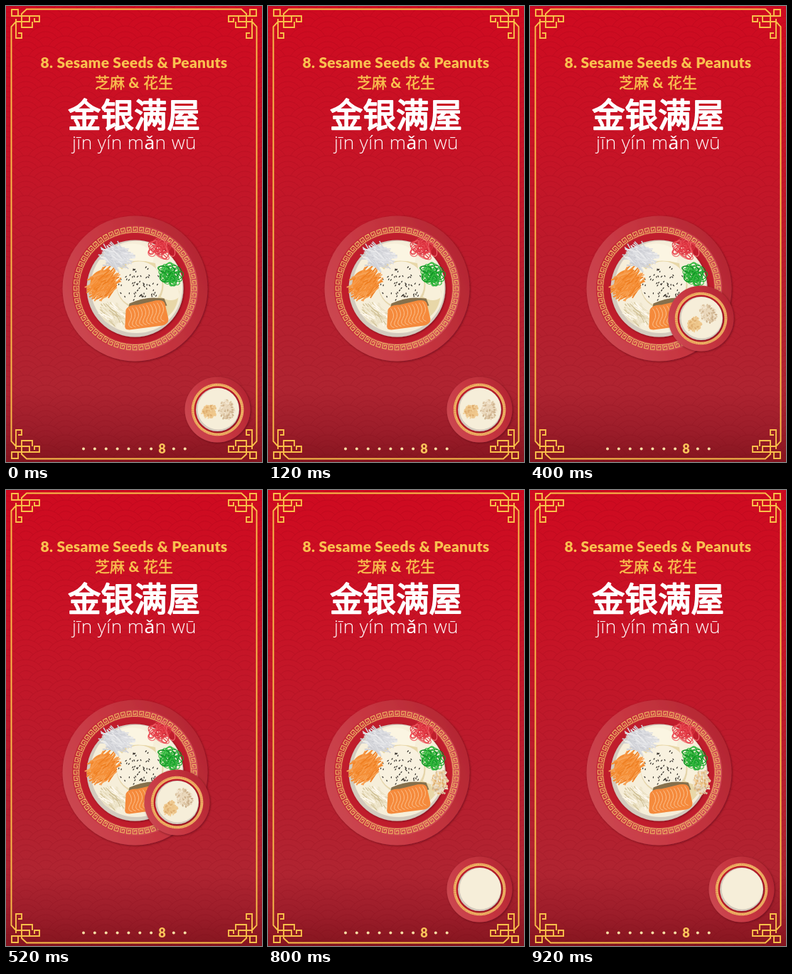
These frames come from a looping animation (360 by 640 pixels, 1 s). An HTML page:

```html
<!DOCTYPE html>
<html lang="en">
<head>
<meta charset="utf-8">
<title>Sesame Seeds &amp; Peanuts</title>
<style>
html, body { margin: 0; width: 100%; height: 100%; overflow: hidden; background: #c0182b; }
svg { display: block; width: 360px; height: 640px; }
text { text-anchor: middle; stroke-linejoin: round; }
.title { font: 900 21px Lato, sans-serif; letter-spacing: .25px; fill: #f9c04f; }
.sub { font: 400 21px Lato, "Noto Sans CJK SC", "Noto Sans CJK", sans-serif; fill: #f9c04f; stroke: #f9c04f; stroke-width: .5; }
.sub tspan { font-weight: 800; stroke: none; }
.big { font: 400 46.5px "Noto Sans CJK SC", "Noto Sans CJK", sans-serif; fill: #fff; stroke: #fff; stroke-width: 1.9; }
.pinyin { font: 300 26.3px "Open Sans", "Noto Sans", sans-serif; letter-spacing: .4px; fill: #fff; }
.page { font: 900 18px Lato, sans-serif; fill: #f9c35a; }
</style>
</head>
<body>
<svg id="stage" viewBox="0 0 360 640" fill="none">
  <defs>
    <linearGradient id="sky" x2="0" y2="1">
      <stop stop-color="#cf0a20"/><stop offset=".3" stop-color="#c81326"/>
      <stop offset=".6" stop-color="#ba1c2d"/><stop offset=".84" stop-color="#b02431"/>
      <stop offset=".93" stop-color="#9c1d2a"/><stop offset="1" stop-color="#85151f"/>
    </linearGradient>
    <linearGradient id="dish" x1=".05" y1=".7" x2=".95" y2=".3">
      <stop stop-color="#cb4650"/><stop offset=".45" stop-color="#c73641"/><stop offset="1" stop-color="#b52733"/>
    </linearGradient>
    <linearGradient id="lane" x1="0" y1=".3" x2="1" y2=".7">
      <stop stop-color="#c32a37"/><stop offset="1" stop-color="#d2505a"/>
    </linearGradient>
    <filter id="shade" x="-20%" y="-20%" width="140%" height="140%">
      <feDropShadow dx="1" dy="1" stdDeviation="1.6" flood-color="#4a0008" flood-opacity=".55"/>
    </filter>
    <g id="corner" stroke="#f9bf4a" stroke-width="1.9">
      <path d="M180 4.5H29L22 11V30H37V22M7.5 320V29L14 22H33V15M8 5H17V14H8ZM17 14H47V22H40V17M14 18V45H22V38H17"/>
    </g>
  </defs>
  <rect width="360" height="640" fill="url(#sky)"/>
  <path id="waves" stroke="#6a0014" stroke-opacity=".13"/>
  <use href="#corner"/>
  <use href="#corner" transform="matrix(-1 0 0 1 360 0)"/>
  <use href="#corner" transform="matrix(1 0 0 -1 0 640)"/>
  <use href="#corner" transform="matrix(-1 0 0 -1 360 640)"/>
  <text class="title" x="180" y="87">8. Sesame Seeds &amp; Peanuts</text>
  <text class="sub" x="180" y="115">芝麻 <tspan>&amp;</tspan> 花生</text>
  <text class="big" x="180" y="170">金银满屋</text>
  <text class="pinyin" x="180.5" y="201">jīn yín mǎn wū</text>
  <g id="dots" fill="#f9dfa5"></g>
  <text class="page" x="219.5" y="628">8</text>
  <g id="main" transform="translate(181.5 396.5)"></g>
  <g id="side"></g>
</svg>
<script>
const $ = id => document.getElementById(id);
let seed = 8;
const rnd = () => (seed = seed * 16807 % 2147483647) / 2147483647;
const spread = r => (rnd() * 2 - 1) * r;
const pick = list => list[Math.floor(rnd() * list.length)];
const repeat = (n, fn) => Array.from({ length: n }, (_, i) => fn(i)).join('');
const f = v => v.toFixed(1);

// a random point inside an ellipse
function spot(cx, cy, rx, ry) {
  const a = rnd() * 2 * Math.PI, r = Math.sqrt(rnd());
  return [cx + rx * r * Math.cos(a), cy + ry * r * Math.sin(a)];
}

const blob = (cx, cy, rx, ry, fill) =>
  `<ellipse cx="${cx}" cy="${cy}" rx="${rx}" ry="${ry}" fill="${fill}"/>`;

// a heap of shredded strips lying at roughly the same angle (degrees)
function strips(n, cx, cy, rx, ry, angle, wobble, len, width, colors) {
  return blob(cx, cy, rx, ry, colors[0]) + repeat(n, () => {
    const [x, y] = spot(cx, cy, rx, ry);
    const a = (angle + spread(wobble)) * Math.PI / 180;
    const dx = Math.cos(a) * len / 2, dy = Math.sin(a) * len / 2;
    return `<path d="M${f(x - dx)} ${f(y - dy)}L${f(x + dx)} ${f(y + dy)}" stroke="${pick(colors)}" stroke-width="${width}"/>`;
  });
}

// a tangle of thin loops
function tangle(n, cx, cy, rx, ry, colors) {
  return repeat(n, () => {
    const [x, y] = spot(cx, cy, rx, ry);
    return `<ellipse cx="${f(x)}" cy="${f(y)}" rx="${f(4 + rnd() * 7)}" ry="${f(2 + rnd() * 4)}"
      transform="rotate(${f(rnd() * 180)} ${f(x)} ${f(y)})" stroke="${pick(colors)}" stroke-width="1.1"/>`;
  });
}

function crumbs(n, cx, cy, rx, ry, colors) {
  return blob(cx, cy, rx * .8, ry * .8, colors[0]) + repeat(n, () => {
    const [x, y] = spot(cx, cy, rx, ry);
    return `<ellipse cx="${f(x)}" cy="${f(y)}" rx="1.9" ry="1.2" fill="${pick(colors)}" transform="rotate(${f(rnd() * 180)} ${f(x)} ${f(y)})"/>`;
  });
}

const tan = ['#ecc48a', '#f2d09a', '#dfae70', '#f0c88c'];
const pale = ['#ead8bc', '#dcc4a2', '#f3e7d2', '#ceb28e'];

// red dish, key-pattern band and cream bowl
function plate(r, band, size, count, bowl) {
  const key = `M-.5 .5H.4V-.4H-.3V.2H.1V-.1`;
  return `<circle r="${r}" fill="url(#dish)" filter="url(#shade)"/>
    <circle r="${band + size * .7}" fill="url(#lane)"/>
    <circle r="${band - size * .7}" fill="#c01d2c"/>` +
    repeat(count, i => `<path d="${key}" stroke="#efb562" stroke-width="${1.1 / size}"
      transform="rotate(${f(i * 360 / count)}) translate(0 ${-band}) scale(${size})"/>`) +
    `<circle r="${bowl}" fill="#d3cabd" filter="url(#shade)"/>
    <circle cx="${bowl * .03}" cy="${-bowl * .03}" r="${bowl * .95}" fill="#f6eed9"/>`;
}

const salmon = `<path d="M-8 21Q10 13 26 13L41 14L45 24L-10 30Z" fill="#86704c"/>
  <path d="M-13 30Q-9 22 3 23L24 18Q39 14 42 21L47 43Q47 50 38 52L-8 58Q-16 58-14 50Z" fill="#f58a3c"/>` +
  repeat(10, i => `<path d="M${-9 + i * 5} ${f(28 - i)}q7 9 2 17t3 10" stroke="#fcc08c"/>`);

$('main').innerHTML = plate(102, 83, 8, 60, 68) +
  blob(-4, -42, 30, 21, '#fbf5e2') +
  `<path d="M-25-33Q10-48 50-26L62 4Q60 32 42 42L30 20Z" fill="#e8d7a8"/>
   <path d="M28-40Q62-22 62 12Q50 22 34 10Z" fill="#f8f0da"/>` +
  blob(7, -4, 33, 33, '#e5d5ab') + blob(6, -6, 32, 32, '#f8f1df') +
  repeat(58, () => {
    const [x, y] = spot(6, -6, 30, 26);
    return `<path d="M${f(x)} ${f(y)}l${f(spread(1.4))} 1.3" stroke="#2f2a25" stroke-width="1.2" stroke-linecap="round"/>`;
  }) +
  strips(75, -31, 36, 16, 14, 40, 30, 16, 1.3, ['#ece2c6', '#f9f2de', '#d3c49a', '#fffaf0']) +
  strips(90, -45, -7, 18, 19, -42, 25, 22, 1.8, ['#f58e36', '#f79b4a', '#ef8024', '#f7a357']) +
  strips(80, -26, -45, 17, 15, 30, 35, 20, 1.6, ['#dddee2', '#d3d4d9', '#eaeaec', '#cbccd2']) +
  salmon +
  tangle(28, 35, -55, 15, 10, ['#e8434d', '#f0686c', '#d92f3d']) +
  `<g id="served">${crumbs(110, 60, 13, 12, 19, [...pale, ...tan])}</g>` +
  tangle(38, 48, -20, 12, 11, ['#18a32b', '#0d8a20', '#35bb3f']);

$('side').innerHTML = plate(46, 35, 3, 70, 30.5) +
  `<g id="nuts">${crumbs(75, -12, 2, 11, 10, tan)}${crumbs(100, 13, 0, 11, 14, pale)}</g>`;

$('dots').innerHTML = repeat(10, i => i === 7 ? '' : `<circle cx="${f(109 + i * 15.85)}" cy="621.5" r="2"/>`);

// overlapping scales: each ring stops where its neighbours cover it
const R = 28;
let scales = '';
for (let row = 0; row < 50; row++)
  for (let x = row % 2 * R; x < 400; x += 2 * R)
    for (const k of [1, .72, .44]) {
      const a = Math.atan(.5) + Math.asin((k + .25 / k) / Math.sqrt(5));
      const dx = R * k * Math.sin(a), y = row * R / 2 - R * k * Math.cos(a);
      scales += `M${f(x - dx)} ${f(y)}A${R * k} ${R * k} 0 0 1 ${f(x + dx)} ${f(y)}`;
    }
$('waves').setAttribute('d', scales);

// plate x, y; nuts: shift and tilt while full
const poses = [
  { x: 297.5, y: 566.5, tilt: 0, shift: 0, full: true },
  { x: 270.5, y: 508.5, tilt: -20, shift: 3, full: true },
  { x: 240.5, y: 438.5, tilt: -33, shift: -1, full: true },
  { x: 271, y: 460.5 },
  { x: 297.5, y: 560.5 }
];

function draw(now) {
  const step = Math.floor(now % 1000 / 200), p = poses[step];
  $('side').setAttribute('transform', `translate(${p.x} ${p.y})`);
  $('nuts').setAttribute('display', p.full ? 'inline' : 'none');
  if (p.full) $('nuts').setAttribute('transform', `translate(${p.shift} 0) rotate(${p.tilt})`);
  $('served').setAttribute('display', step > 2 ? 'inline' : 'none');
  requestAnimationFrame(draw);
}
draw(performance.now());
</script>
</body>
</html>
```
